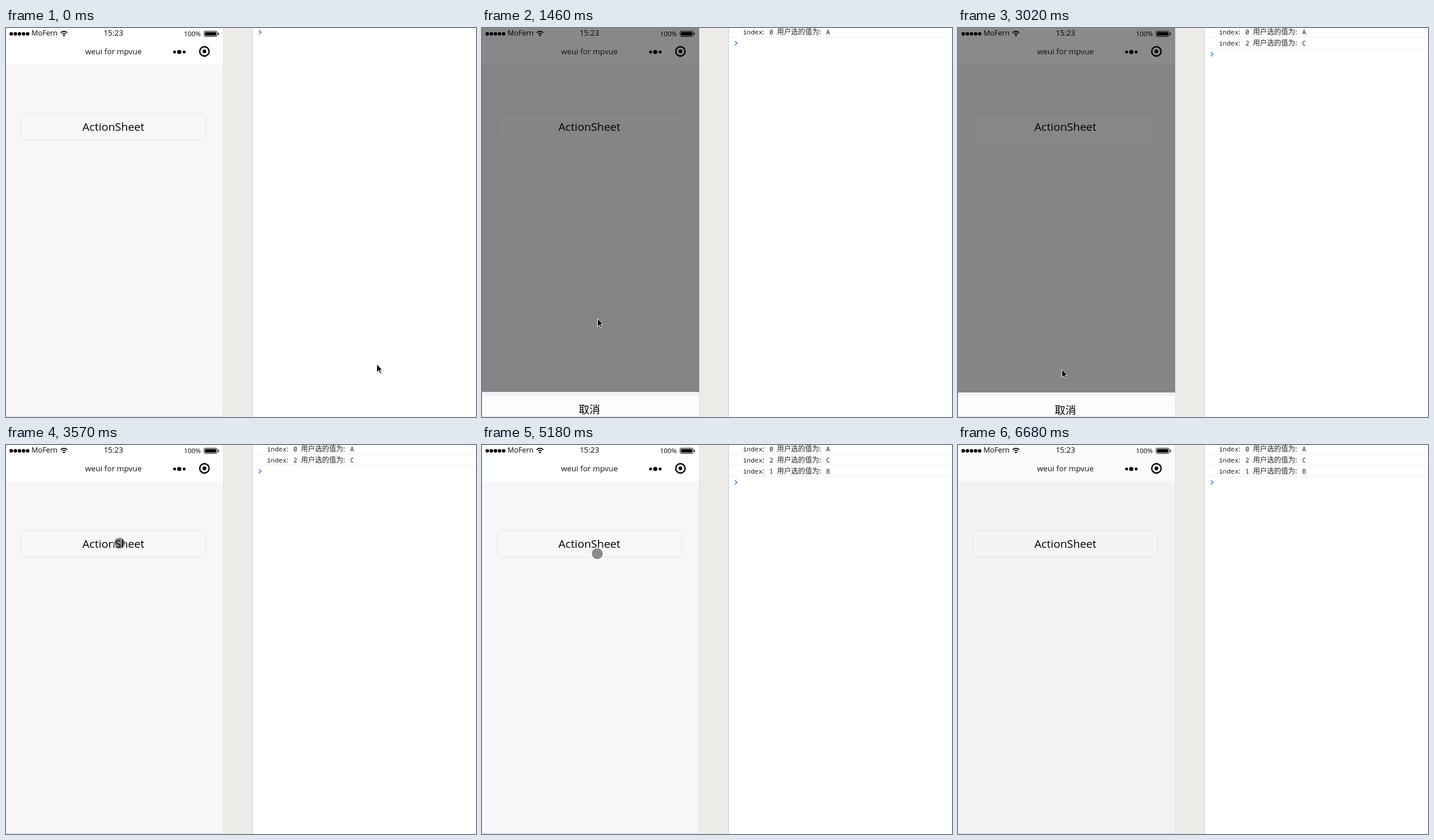
These frames come from a looping animation (803x666 px, 7380 ms). An HTML page with a canvas:

```html
<!DOCTYPE html>
<html lang="zh-CN">
<head>
<meta charset="utf-8">
<title>ActionSheet</title>
<style>
  html, body { margin: 0; width: 100%; height: 100%; overflow: hidden; background: #fff; }
  canvas { display: block; width: 803px; height: 666px; }
</style>
</head>
<body>
<canvas id="stage" width="803" height="666"></canvas>
<script>
const ctx = document.getElementById('stage').getContext('2d');
const LOOP = 7380, FADE = 300;
const PHONE_W = 371, PHONE_H = 665, ROW = 48, GAP = 6;
const UI = '"Open Sans", "Noto Sans CJK SC", "Noto Sans CJK", sans-serif';
const MONO = '"Noto Sans Mono", monospace';
const CJK = '"Noto Sans CJK SC", "Noto Sans CJK", sans-serif';

// Screen refreshes: [start, end, steps]
const bursts = [
  [70, 380, 5], [530, 1170, 9], [1400, 1940, 8], [2180, 2560, 6], [2790, 2790, 1],
  [2940, 3570, 9], [3720, 4420, 10], [4490, 5180, 10], [5410, 5960, 8], [6130, 6680, 8]
];
const sheets = [
  { open: 690, close: 1427 }, { open: 2139, close: 2967 },
  { open: 3680, close: 4670 }, { open: 5370, close: 6443 }
];
const picks = [[0, 'A'], [2, 'C'], [1, 'B']];
// Pointer moves: [start, end, x, y]
const moves = [
  [0, 380, 300, 181], [460, 690, 190, 166], [920, 1170, 197, 497],
  [1530, 1940, 182, 156], [2330, 2560, 177, 574], [2720, 2790, 177, 584],
  [3080, 3570, 194, 168], [3960, 4420, 203, 452], [4430, 4640, 187, 535],
  [4780, 5180, 197, 186], [5600, 5960, 190, 638], [6360, 6620, 192, 690]
];

const clamp = v => Math.max(0, Math.min(1, v));
const smooth = v => v * v * (3 - 2 * v);

// cubic-bezier(.25, .1, .25, 1)
function ease(x) {
  if (x <= 0 || x >= 1) return clamp(x);
  let lo = 0, hi = 1, s = x;
  for (let i = 0; i < 24; i++) {
    s = (lo + hi) / 2;
    if (0.75 * s * (1 - s) + s ** 3 < x) lo = s; else hi = s;
  }
  return 0.3 * s * (1 - s) ** 2 + 3 * s * s * (1 - s) + s ** 3;
}

function refreshTime(t) {
  let shown = 0;
  for (const [start, end, n] of bursts) {
    if (t < start) break;
    const step = (end - start) / (n - 1 || 1);
    const k = step ? Math.min(n - 1, Math.floor((t - start) / step + 0.25)) : 0;
    shown = start + k * step;
  }
  return shown;
}

function pointerAt(t) {
  let x = 633, y = 575;
  for (const [start, end, tx, ty] of moves) {
    const p = smooth(clamp((t - start) / (end - start)));
    x += (tx - x) * p;
    y += (ty - y) * p;
  }
  return [x, y];
}

function rect(x, y, w, h, color) {
  ctx.fillStyle = color;
  ctx.fillRect(x, y, w, h);
}

function dot(x, y, r, color = '#000') {
  ctx.fillStyle = color;
  ctx.beginPath();
  ctx.arc(x, y, r, 0, Math.PI * 2);
  ctx.fill();
}

function ring(x, y, r, width, color) {
  ctx.strokeStyle = color;
  ctx.lineWidth = width;
  ctx.beginPath();
  ctx.arc(x, y, r, 0, Math.PI * 2);
  ctx.stroke();
}

function text(str, x, y, size, { align = 'left', color = '#000', font = UI } = {}) {
  ctx.font = `${size}px ${font}`;
  ctx.textAlign = align;
  ctx.fillStyle = color;
  ctx.fillText(str, x, y);
}

function roundBox(x, y, w, h, r, fill, stroke) {
  ctx.beginPath();
  ctx.roundRect(x, y, w, h, r);
  if (fill) { ctx.fillStyle = fill; ctx.fill(); }
  if (stroke) { ctx.strokeStyle = stroke; ctx.lineWidth = 1; ctx.stroke(); }
}

function drawWifi(x, y) {
  ctx.strokeStyle = '#000';
  ctx.lineWidth = 1.7;
  for (const r of [4.2, 7.6]) {
    ctx.beginPath();
    ctx.arc(x, y, r, -Math.PI * 0.77, -Math.PI * 0.23);
    ctx.stroke();
  }
  dot(x, y - 0.6, 1.5);
}

function drawStatusBar() {
  for (let i = 0; i < 5; i++) dot(9 + i * 7, 10, 3);
  text('MoFern', 43.5, 13, 12.4);
  drawWifi(99, 13.3);
  text('15:23', 183.5, 13, 13, { align: 'center' });
  text('100%', 304, 14, 11.4);
  roundBox(338.5, 5.5, 22, 9, 2, null, '#000');
  roundBox(340, 7, 19, 6, 1, '#000');
  rect(362, 8, 1.5, 4, '#000');
}

function drawPage() {
  rect(0, 0, PHONE_W, 62, '#fff');
  rect(0, 62, PHONE_W, PHONE_H - 62, '#f7f7f7');
  roundBox(26.5, 146.5, 314, 45, 5, '#f8f8f8', '#e4e4e4');
}

// Labels stay black beneath the mask
function drawLabels() {
  drawStatusBar();
  text('weui for mpvue', 183.5, 45, 13.3, { align: 'center', color: '#111' });
  dot(288, 41, 2.5);
  dot(296, 41, 3.6);
  dot(304.3, 41, 2.5);
  ring(339, 40, 8, 2.3, '#000');
  dot(339, 40, 3.2);
  text('ActionSheet', 183.5, 176, 19, { align: 'center' });
}

function drawSheet(top, items) {
  let y = top;
  items.forEach((item, i) => {
    rect(0, y, PHONE_W, ROW, '#fcfcfc');
    if (i) rect(0, y, PHONE_W, 1, '#ececec');
    text(item, 183.5, y + 31, 19, { align: 'center' });
    y += ROW;
  });
  rect(0, y, PHONE_W, GAP, '#f1f1f6');
  rect(0, y + GAP, PHONE_W, ROW, '#fcfcfc');
  text('取消', 183.5, y + GAP + 31, 18.3, { align: 'center' });
}

function drawPhone(t) {
  ctx.save();
  ctx.beginPath();
  ctx.rect(0, 0, PHONE_W, PHONE_H);
  ctx.clip();
  drawPage();
  const sheet = sheets.find(s => t >= s.open && t < s.close + FADE);
  const shown = sheet
    ? ease((t - sheet.open) / FADE) - ease((t - sheet.close) / FADE) : 0;
  if (shown > 0) rect(0, 0, PHONE_W, PHONE_H, `rgba(0,0,0,${0.6 * shown})`);
  drawLabels();
  if (shown > 0) {
    const items = t < sheet.close - 27 ? ['A', 'B', 'C'] : [];
    const height = items.length * ROW + GAP + ROW;
    drawSheet(Math.round(PHONE_H - height * shown), items);
  }
  ctx.restore();
  rect(0, PHONE_H, PHONE_W, 1, '#d9d9d9');
}

function drawConsole(t) {
  rect(PHONE_W, 0, 50, 666, '#ecebe7');
  rect(PHONE_W, 0, 1, 666, '#e1e0dd');
  rect(421, 0, 1, 666, '#cfcfcd');
  rect(422, 0, 381, 666, '#fff');
  const rows = picks.filter((_, i) => t >= sheets[i].close + 20);
  const mono = { font: MONO, color: '#222' }, han = { font: CJK, color: '#222' };
  rows.forEach(([index, value], i) => {
    const y = 11 + i * 19;
    text('index', 446, y, 11, mono);
    text(':', 479, y, 12, han);
    text(index, 491, y, 11, mono);
    text('用户选的值为:', 504, y, 12, han);
    text(value, 588, y, 11, mono);
    rect(422, y + 4, 381, 1, '#f0f0f0');
  });
  const y = 7 + rows.length * 19;
  ctx.strokeStyle = '#367cf1';
  ctx.lineWidth = 1.6;
  ctx.beginPath();
  ctx.moveTo(432, y - 3.5);
  ctx.lineTo(435.7, y);
  ctx.lineTo(432, y + 3.5);
  ctx.stroke();
}

function drawArrow(x, y) {
  ctx.save();
  ctx.translate(x + 0.5, y + 0.5);
  ctx.beginPath();
  [[0, 0], [0, 14], [3.2, 11], [5.4, 16], [7.6, 15], [5.4, 10.2], [9.6, 10.2]]
    .forEach(([px, py]) => ctx.lineTo(px, py));
  ctx.closePath();
  ctx.fillStyle = '#000';
  ctx.fill();
  ctx.strokeStyle = '#fff';
  ctx.lineWidth = 1;
  ctx.shadowColor = 'rgba(0,0,0,.35)';
  ctx.shadowBlur = 2;
  ctx.shadowOffsetX = ctx.shadowOffsetY = 1;
  ctx.stroke();
  ctx.restore();
}

function drawPointer(t) {
  const [x, y] = pointerAt(t);
  const overSheet = sheets.some(s => t > s.open + 230 && t < s.close + FADE);
  if (x > PHONE_W || overSheet) return drawArrow(Math.round(x), Math.round(y));
  dot(x, y, 9.5, 'rgba(0,0,0,.44)');
  ring(x, y, 10.2, 1.8, 'rgba(255,255,255,.5)');
}

function frame(now) {
  const t = refreshTime(now % LOOP);
  drawConsole(t);
  drawPhone(t);
  drawPointer(t);
  requestAnimationFrame(frame);
}
requestAnimationFrame(frame);
</script>
</body>
</html>
```
